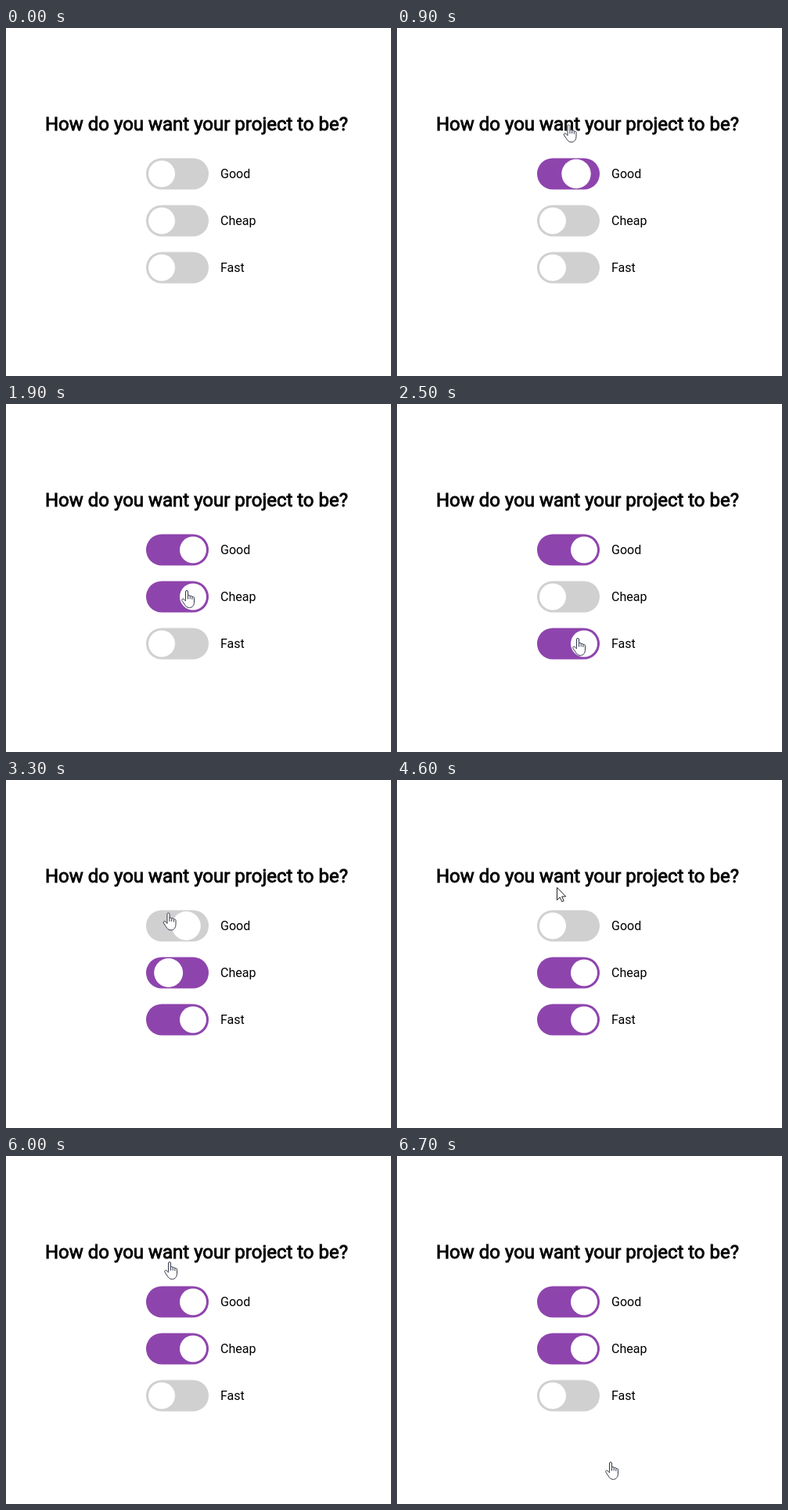
An HTML page with a canvas for the animation above (6.9 s loop, 492x445 px).

```html
<!DOCTYPE html>
<html lang="en">
<head>
<meta charset="utf-8">
<title>Project toggles</title>
<style>
html, body { margin: 0; width: 100%; height: 100%; overflow: hidden; background: #fff; }
body { position: relative; font: 16px/19px Roboto, sans-serif; color: #000; }
h2, span, canvas { position: absolute; margin: 0; white-space: nowrap; }
h2 { left: 50px; top: 109px; font-size: 24px; line-height: 28px; font-weight: 400; -webkit-text-stroke: .85px #000; }
span { left: 274px; }
canvas { left: 0; top: 0; }
</style>
</head>
<body>
<h2>How do you want your project to be?</h2>
<span style="top:177px">Good</span>
<span style="top:237px">Cheap</span>
<span style="top:297px">Fast</span>
<canvas id="stage" width="492" height="445"></canvas>
<script>
const ctx = document.getElementById('stage').getContext('2d');
const LOOP = 6900, STEP = 100, SLIDE = 300;

// Times at which each switch flips, starting from off
const toggles = [
  { y: 166.5, flips: [675, 3235, 5170] },
  { y: 226.5, flips: [1465, 2198, 3235] },
  { y: 286.5, flips: [2198, 5170] }
];

// Pointer hotspot: time, x, y, shape
const moves = [
  [300, 226, 107, 'arrow'], [400, 224, 140, 'arrow'], [500, 222, 176, 'hand'],
  [700, 221, 178, 'hand'], [800, 220, 158, 'hand'], [900, 219.5, 123.5, 'hand'],
  [1000, 220, 128, 'arrow'], [1100, 223, 172, 'hand'], [1300, 229, 240, 'hand'],
  [1800, 229, 240, 'hand'], [1900, 231, 238, 'hand'],
  [2100, 231, 238, 'hand'], [2200, 231, 299, 'hand'],
  [2900, 231, 299, 'hand'], [3000, 218, 262, 'hand'], [3100, 211, 240, 'hand'],
  [3200, 211, 240, 'hand'], [3300, 207.5, 169.5, 'hand'], [3400, 205, 144, 'arrow'],
  [3700, 204, 141, 'arrow'], [4500, 204, 141, 'arrow'], [4600, 204, 137, 'arrow'],
  [4700, 204, 87, 'arrow'], [4800, 204, 87, 'arrow'], [4900, 206, 130, 'arrow'],
  [5000, 209, 175, 'hand'], [5500, 209, 175, 'hand'], [5600, 209, 173, 'hand'],
  [5900, 209, 173, 'hand'], [6000, 209, 135, 'hand'], [6100, 211, 140, 'arrow'],
  [6200, 217, 185, 'hand'], [6400, 245, 300, 'hand'], [6600, 271, 389, 'hand'],
  [6700, 273, 391, 'hand']
];

const shapes = {
  arrow: new Path2D('M.5 .5V16.5L4.2 13L6.8 18.6L9.2 17.5L6.7 12H11.7Z'),
  hand: new Path2D('M-1.5 12.5V2Q-1.5 .5 0 .5Q1.5 .5 1.5 2V7.5Q1.6 6.5 2.9 6.5Q4.2 6.6 4.2 8' +
    'Q4.5 7.2 5.6 7.3Q6.9 7.5 6.9 8.9Q7.3 8.3 8.2 8.5Q9.5 8.8 9.5 10.2V15' +
    'C9.5 19.5 7 22.5 3.5 22.5C0 22.5-1.5 20.5-3 18L-6 13.6Q-6.9 12-5.6 11.3Q-4.3 10.7-3 12.2L-1.5 14Z' +
    'M1.5 7.5V11.5M4.2 8V11.5M6.9 8.9V12')
};

function drawToggle({ y, flips }, t) {
  const past = flips.filter(f => f <= t);
  const on = past.length % 2 === 1;
  const p = past.length ? Math.min(1, (t - past[past.length - 1]) / SLIDE) : 1;
  const scale = 1 + .2 * (1 - Math.abs(2 * p - 1));
  ctx.fillStyle = on ? '#8e44ad' : '#d0d0d0';
  ctx.beginPath();
  ctx.roundRect(179, y, 80, 40, 20);
  ctx.fill();
  ctx.fillStyle = '#fff';
  ctx.beginPath();
  ctx.arc(199 + 40 * (on ? p : 1 - p), y + 20, 17 * scale, 0, 2 * Math.PI);
  ctx.fill();
}

function drawPointer(t) {
  if (t < moves[0][0]) return;
  const i = moves.findLastIndex(m => m[0] <= t);
  const a = moves[i], b = moves[i + 1] || a;
  const k = b === a ? 0 : (t - a[0]) / (b[0] - a[0]);
  const shape = shapes[a[3]];
  ctx.save();
  ctx.translate(a[1] + (b[1] - a[1]) * k, a[2] + (b[2] - a[2]) * k);
  ctx.fillStyle = '#fff';
  ctx.strokeStyle = a[3] === 'hand' ? '#34384a' : '#222';
  ctx.lineWidth = 1;
  ctx.lineJoin = 'round';
  ctx.fill(shape);
  ctx.stroke(shape);
  ctx.restore();
}

const start = performance.now();

function draw() {
  const now = (performance.now() - start) % LOOP;
  const t = Math.floor(now / STEP) * STEP;
  ctx.clearRect(0, 0, 492, 445);
  toggles.forEach(s => drawToggle(s, t));
  drawPointer(t);
  requestAnimationFrame(draw);
}
draw();
</script>
</body>
</html>
```
